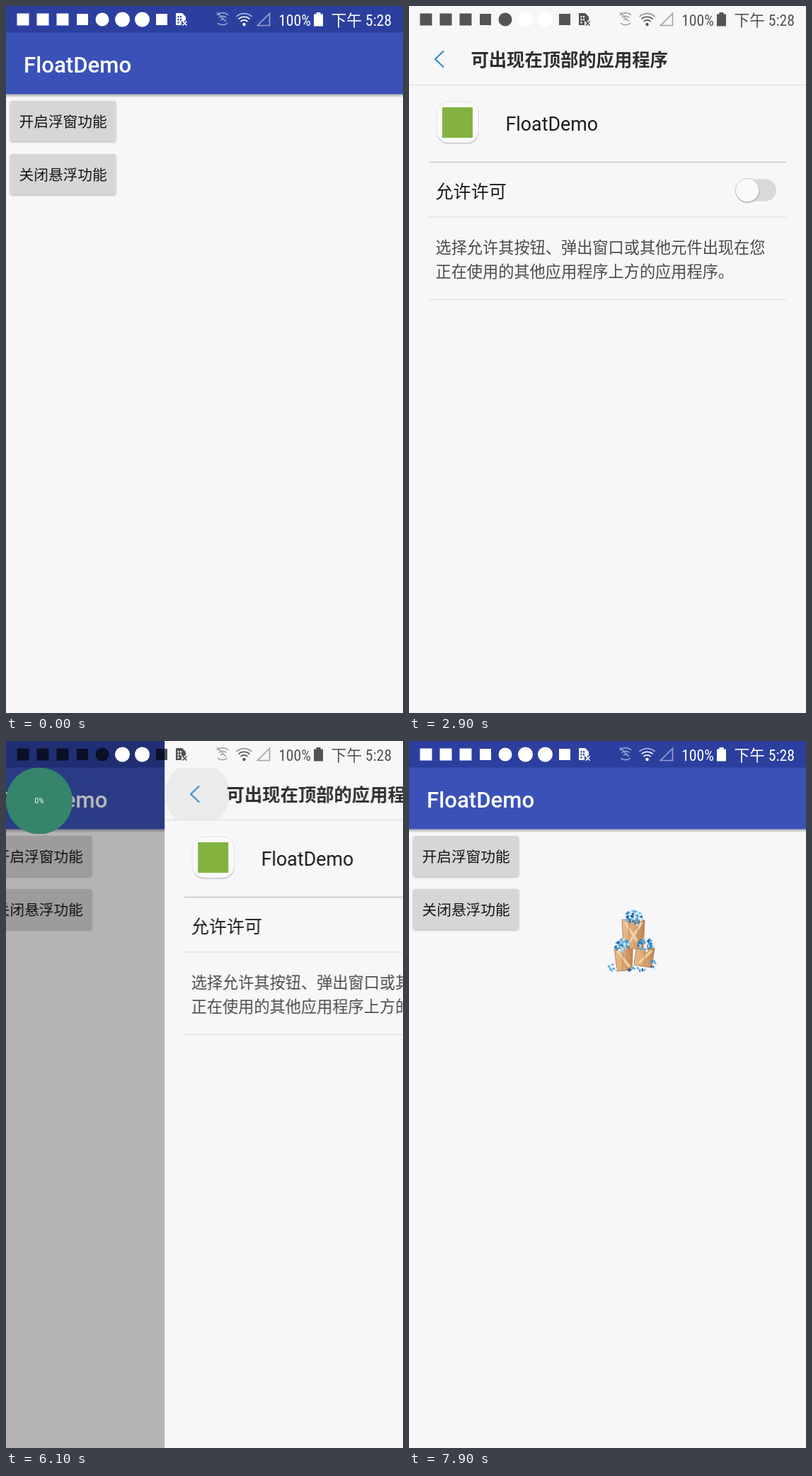
These frames come from a looping animation (561x998 px, 8 s). An HTML page:

```html
<!DOCTYPE html>
<html lang="zh-CN">
<head>
<meta charset="utf-8">
<title>FloatDemo</title>
<style>
html, body { margin: 0; width: 100%; height: 100%; overflow: hidden; background: #f7f6f9; }
svg { display: block; width: 100vw; height: 100vh; overflow: hidden; }
text { font-family: Roboto, "Noto Sans CJK SC", "Noto Sans CJK", "Noto Sans", sans-serif; white-space: pre; }
.label { font-size: 20.7px; fill: #161616; }
.note { font-size: 22.2px; fill: #4b4a4c; }
.status { font-family: "Roboto Condensed", Roboto, "Noto Sans CJK SC", "Noto Sans CJK", sans-serif; font-size: 21.7px; text-anchor: end; fill: currentColor; }
.line { fill: none; stroke: currentColor; stroke-width: 1.7; }
.faint { opacity: .5; }

/* One 8 s clock for everything: 1% = 80 ms */
.paper, .main, .dim, .page, .tint, .press, .press circle, .back, .knob, .track, .float, .ball, .crate {
  animation: 8s linear infinite;
}
.paper { animation-name: paper; animation-timing-function: step-end; }
.main { animation-name: main; }
.dim { animation-name: dim; }
.page { animation-name: page; }
.tint { animation-name: tint; }
.press { animation-name: press; }
.press circle, .back { transform-box: fill-box; transform-origin: center; }
.press circle { animation-name: spread; }
.back { animation-name: back; }
.knob { animation-name: knob; }
.track { animation-name: track; }
.float { animation-name: drag; }
.ball { animation-name: ball; animation-timing-function: step-end; }
.crate { animation-name: crate; animation-timing-function: step-end; }

@keyframes paper { 0% { fill: #f8f7f5 } 25%, 100% { fill: #f7f6f9 } }
@keyframes page {
  0%, 28.75% { transform: translateX(561px) }
  30% { transform: translateX(339px) }
  31.25% { transform: translateX(121px) }
  32.5% { transform: translateX(17px) }
  33.75%, 75% { transform: translateX(0) }
  76.25% { transform: translateX(222px) }
  77.5% { transform: translateX(440px) }
  78.75% { transform: translateX(544px) }
  80%, 100% { transform: translateX(561px) }
}
@keyframes main {
  0%, 28.75% { transform: translateX(0) }
  30% { transform: translateX(-22px) }
  31.25% { transform: translateX(-41px) }
  32.5% { transform: translateX(-52px) }
  33.75%, 75% { transform: translateX(-56px) }
  76.25% { transform: translateX(-34px) }
  77.5% { transform: translateX(-16px) }
  78.75% { transform: translateX(-5px) }
  80%, 100% { transform: translateX(0) }
}
@keyframes dim {
  0%, 28.75% { opacity: 0 }
  33.75%, 75% { opacity: .42 }
  76.25% { opacity: .27 }
  77.5% { opacity: .14 }
  78.75% { opacity: .065 }
  80%, 100% { opacity: 0 }
}
@keyframes tint {
  0%, 29.5% { color: #fff }
  31%, 78.3% { color: rgba(0, 0, 0, .66) }
  80%, 100% { color: #fff }
}
@keyframes press {
  0%, 13.7% { opacity: 0 }
  15%, 19% { opacity: .13 }
  23.75%, 100% { opacity: 0 }
}
@keyframes spread {
  0%, 13.75% { transform: scale(.1) }
  18.75%, 100% { transform: scale(1) }
}
@keyframes back {
  0%, 72.4% { opacity: 0; transform: scale(.4) }
  74%, 80% { opacity: 1; transform: scale(1) }
  80.1%, 100% { opacity: 0; transform: scale(1) }
}
@keyframes knob {
  0%, 45% { transform: translateX(0); animation-timing-function: ease-in-out }
  49%, 100% { transform: translateX(25px) }
}
@keyframes track { 0%, 45% { fill: #dad9da } 49%, 100% { fill: #49b0e3 } }
@keyframes drag {
  0%, 92.5% { transform: translate(47px, 84.5px) }
  93.75% { transform: translate(80px, 110px) }
  95% { transform: translate(142px, 158px) }
  96.25% { transform: translate(215px, 213px) }
  97.5% { transform: translate(280px, 260px) }
  98.75%, 100% { transform: translate(316px, 283px) }
}
@keyframes ball { 0% { opacity: 0 } 75.6% { opacity: 1 } 93.75%, 100% { opacity: 0 } }
@keyframes crate { 0% { opacity: 0 } 93.75%, 100% { opacity: 1 } }
</style>
</head>
<body>
<svg viewBox="0 0 561 998" preserveAspectRatio="none">
  <defs>
    <linearGradient id="shade" x2="0" y2="1">
      <stop stop-color="#000" stop-opacity=".3"/>
      <stop offset="1" stop-color="#000" stop-opacity="0"/>
    </linearGradient>
    <linearGradient id="wood">
      <stop stop-color="#e9bd8d"/>
      <stop offset=".5" stop-color="#dca673"/>
      <stop offset="1" stop-color="#bf8351"/>
    </linearGradient>
    <filter id="lift" x="-10%" y="-20%" width="120%" height="150%">
      <feDropShadow dx="0" dy="1.5" stdDeviation="1.4" flood-opacity=".3"/>
    </filter>
    <clipPath id="key"><rect x="6" y="134" width="149" height="57" rx="3"/></clipPath>
    <clipPath id="head"><rect y="38" width="561" height="73"/></clipPath>
  </defs>

  <rect class="paper" width="561" height="998"/>
  <g class="main">
    <rect y="37" x="-60" width="681" height="87.5" fill="#3a52b7"/>
    <rect x="-60" width="681" height="37.5" fill="#2c3f9f"/>
    <rect x="-60" y="124.5" width="681" height="5" fill="url(#shade)"/>
    <text x="25" y="93.5" font-size="31.2" font-weight="500" fill="#fff">FloatDemo</text>
    <g fill="#d6d5d7" filter="url(#lift)">
      <rect x="6" y="134" width="149" height="56.5" rx="3"/>
      <rect x="6" y="209" width="149" height="56.5" rx="3"/>
    </g>
    <g clip-path="url(#key)">
      <g class="press">
        <rect x="6" y="134" width="149" height="57"/>
        <circle cx="80" cy="162" r="80"/>
      </g>
    </g>
    <text class="label" x="18.5" y="171">开启浮窗功能</text>
    <text class="label" x="18.5" y="246">关闭悬浮功能</text>
  </g>
  <rect class="dim" width="561" height="998"/>

  <g class="page">
    <rect width="561" height="998" fill="#f7f6f9"/>
    <g clip-path="url(#head)"><circle class="back" cx="46" cy="75" r="46" fill="#ebebed"/></g>
    <path d="M49 63.5 37 75 49 86.5" fill="none" stroke="#3a8fcb" stroke-width="2.2"/>
    <text x="87.5" y="85" font-size="25.3" font-weight="700" fill="#2f2e30">可出现在顶部的应用程序</text>
    <path d="M0 111.5H561M28 298H533M28 414.5H533" stroke="#e2e1e4" stroke-width="1.3"/>
    <path d="M28 220.5H533" stroke="#c8c7c9" stroke-width="1.3"/>
    <rect x="39" y="136.5" width="60" height="58.5" rx="17" fill="#d0cfd1"/>
    <rect x="39" y="135" width="59.5" height="58" rx="17" fill="#fafafa" stroke="#e2e1e3"/>
    <rect x="47" y="143" width="43" height="43" fill="#82b340"/>
    <text x="136.5" y="175.5" font-size="26.8" fill="#1b1b1c">FloatDemo</text>
    <text x="37.5" y="270.5" font-size="25.1" fill="#1b1b1c">允许许可</text>
    <rect class="track" x="461" y="244.5" width="58" height="31" rx="15.5"/>
    <g class="knob">
      <circle cx="478.3" cy="261" r="17" fill="#b5b4b6"/>
      <circle cx="478" cy="260" r="16.6" fill="#faf9fb" stroke="#bdbcbe" stroke-width=".8"/>
    </g>
    <text class="note" x="37.5" y="349">选择允许其按钮、弹出窗口或其他元件出现在您</text>
    <text class="note" x="37.5" y="382.5">正在使用的其他应用程序上方的应用程序。</text>
  </g>

  <g class="tint">
    <g fill="currentColor">
      <path d="M15.5 10.5h17v17h-17zM43.5 10.5h17v17h-17zM71.5 10.5h17v17h-17zM100 11h16v16h-16zM212 11h16v16h-16z"/>
      <circle cx="136" cy="19" r="9.5"/>
      <path fill-rule="evenodd" d="M240 10h9l5 5v5l-3 2-3-1v6h-8zM242.500 14v2.500h2V14zM246 14v2.500h2V14zM242.500 18v2.500h2V18zM246 18v2.500h2V18zM242.500 22v2.500h2V22z"/>
      <path d="M435 11.500h3.500V9h6v2.500h3.500V28.500h-13z"/>
      <circle cx="336.500" cy="26" r="2.200"/>
    </g>
    <path class="line" d="M249.500 21.500l6 6m0-6l-6 6"/>
    <g class="line">
      <path d="M331.500 22a7 7 0 0 1 10 0"/>
      <path d="M328.500 18.500a11.500 11.500 0 0 1 16 0"/>
      <path d="M325.500 15a16 16 0 0 1 22 0" opacity=".6"/>
    </g>
    <g class="line faint">
      <path d="M355.500 27.500H372.500V10.500z"/>
      <path d="M298 13a11 11 0 0 1 16 0M300.500 16.500a8 8 0 0 1 11 0M303 20a4.500 4.500 0 0 1 6 0M298 9l13 13M299 24a9 7 0 0 0 14 0"/>
    </g>
    <text class="status" x="431" y="28">100%</text>
    <text class="status" x="545" y="28">下午 5:28</text>
  </g>
  <g fill="#fff"><circle cx="164.500" cy="19" r="10.500"/><circle cx="192.500" cy="19" r="10.500"/></g>

  <g class="float">
    <g class="ball">
      <circle r="47" fill="#36846b"/>
      <text y="3.500" font-size="10" text-anchor="middle" fill="#fff">0%</text>
    </g>
    <g class="crate">
      <g fill="url(#wood)" stroke="#a86f42" stroke-width=".8">
        <path d="M-15-31 17-30 15 10-13 10z"/>
        <path d="M-26 8 0 11-1 40-22 42z"/>
        <path d="M5 11 31 9 27 37 2 33z"/>
      </g>
      <path d="M-11-27 11 6M13-27-5 2M-22 13-4 36M9 30 27 13" stroke="#f1cfa4" stroke-width="3.500"/>
      <path d="M-5-30V8M7-30V8M-14 10V40M17 10V34" stroke="#b27a4a" stroke-width=".7"/>
      <g id="gems"></g>
    </g>
  </g>
</svg>
<script>
// Heaps of small gems: centre, radii, count
const heaps = [
  [1, -33, 13, 10, 75], [-14, 6, 11, 9, 55], [19, 4, 11, 9, 55],
  [-28, 37, 6, 6, 12], [29, 34, 5, 8, 14], [6, 40, 15, 3, 14]
];
const tones = ['#3d8ccb', '#8ccbee', '#215f9f', '#d4effb', '#5fb2e2'];
let seed = 7;
const rand = () => (seed = seed * 16807 % 2147483647) / 2147483647;

function gem(cx, cy, rx, ry) {
  const angle = rand() * 2 * Math.PI, reach = Math.sqrt(rand()), size = 1.3 + rand() * 1.3;
  const x = cx + rx * reach * Math.cos(angle), y = cy + ry * reach * Math.sin(angle);
  const tone = tones[Math.floor(rand() * tones.length)];
  return `<path fill="${tone}" d="M${x - size} ${y}l${size} ${-size} ${size} ${size} ${-size} ${size}z"/>`;
}

document.getElementById('gems').innerHTML = heaps
  .map(([cx, cy, rx, ry, count]) => Array.from({ length: count }, () => gem(cx, cy, rx, ry)).join(''))
  .join('');
</script>
</body>
</html>
```
